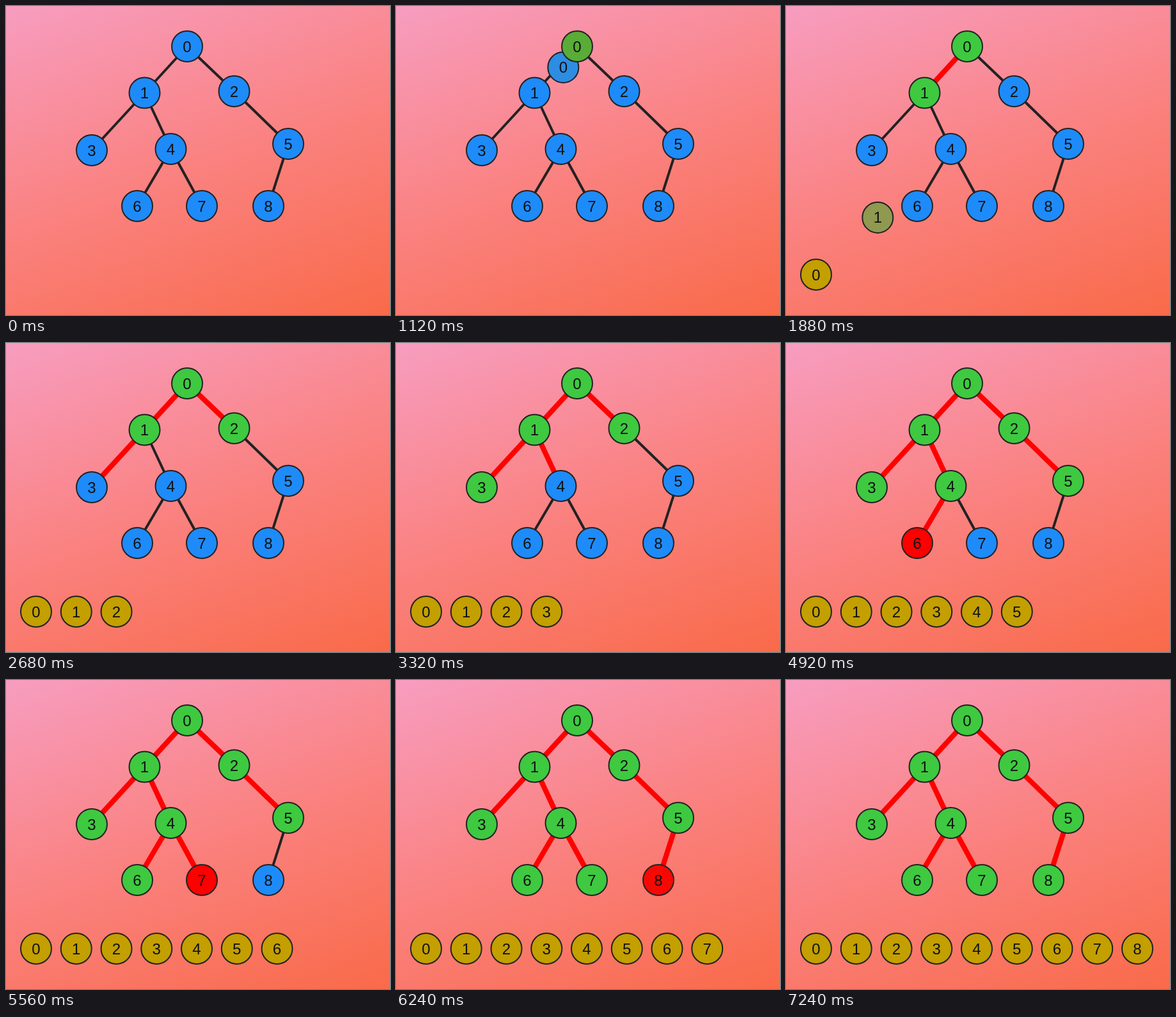
Animation, 600 px wide and 482 px high, one loop 7280 ms. Source, as an HTML page with a canvas:

```html
<!DOCTYPE html>
<html lang="en">
<head>
<meta charset="utf-8">
<title>Breadth-first traversal</title>
<style>
  html, body { margin: 0; width: 100%; height: 100%; overflow: hidden; }
  body { background: linear-gradient(160deg, #f79dc0, #fa8281 50%, #f96a49); }
  canvas { display: block; }
</style>
</head>
<body>
<canvas id="stage" width="600" height="482"></canvas>
<script>
const ctx = document.getElementById('stage').getContext('2d');

const LOOP = 7280, FIRST = 1061, PERIOD = 651, FLIGHT = 280;
const BLUE = [30, 139, 250], RED = [255, 0, 0], GREEN = [62, 201, 64];
const GOLD = [195, 159, 0], INK = [34, 34, 34];

const nodes = [
  [283, 63], [216.5, 135.5], [356.5, 133], [134, 225], [257.5, 223],
  [441, 215], [205, 312], [306, 312], [410, 312]
];
const parents = [null, 0, 0, 1, 1, 2, 4, 4, 5];
const slot = i => [47 + i * 62.75, 419];

const lerp = (a, b, p) => a + (b - a) * p;
const mix = (a, b, p) => a.map((v, i) => lerp(v, b[i], p));
const rgb = c => `rgb(${c.map(Math.round).join()})`;
const clamp = p => Math.min(1, Math.max(0, p));
const ease = p => p < 0.5 ? 2 * p * p : 1 - 2 * (1 - p) ** 2;
const ramp = (t, from, to) => ease(clamp((t - from) / (to - from)));

function edge(a, b, p) {
  ctx.strokeStyle = rgb(mix(INK, RED, p));
  ctx.lineWidth = lerp(4, 8, p);
  ctx.beginPath();
  ctx.moveTo(...a);
  ctx.lineTo(...b);
  ctx.stroke();
}

function disc([x, y], label, fill) {
  ctx.beginPath();
  ctx.arc(x, y, 24, 0, Math.PI * 2);
  ctx.fillStyle = rgb(fill);
  ctx.fill();
  ctx.strokeStyle = rgb(INK);
  ctx.lineWidth = 2;
  ctx.stroke();
  ctx.fillStyle = '#111';
  ctx.fillText(label, x, y + 8.5);
}

function draw(time) {
  // Time relative to the moment each node's copy leaves the tree.
  const local = i => time - FIRST - i * PERIOD;

  ctx.clearRect(0, 0, 600, 482);
  ctx.font = '24px "Liberation Sans", Arial, sans-serif';
  ctx.textAlign = 'center';

  nodes.forEach((pos, i) => {
    if (i) edge(nodes[parents[i]], pos, ramp(local(i), 220 - PERIOD, 310 - PERIOD));
  });
  nodes.forEach((pos, i) => {
    const p = ramp(local(i), 0, FLIGHT);
    if (p > 0) disc(mix(pos, slot(i), p), i, mix(BLUE, GOLD, p));
  });
  nodes.forEach((pos, i) => {
    const t = local(i);
    const visiting = mix(BLUE, RED, ramp(t, 330 - PERIOD, 580 - PERIOD));
    disc(pos, i, mix(visiting, GREEN, ramp(t, -50, 100)));
  });
}

const start = performance.now();
function tick() {
  draw((performance.now() - start) % LOOP);
  requestAnimationFrame(tick);
}
tick();
</script>
</body>
</html>
```
